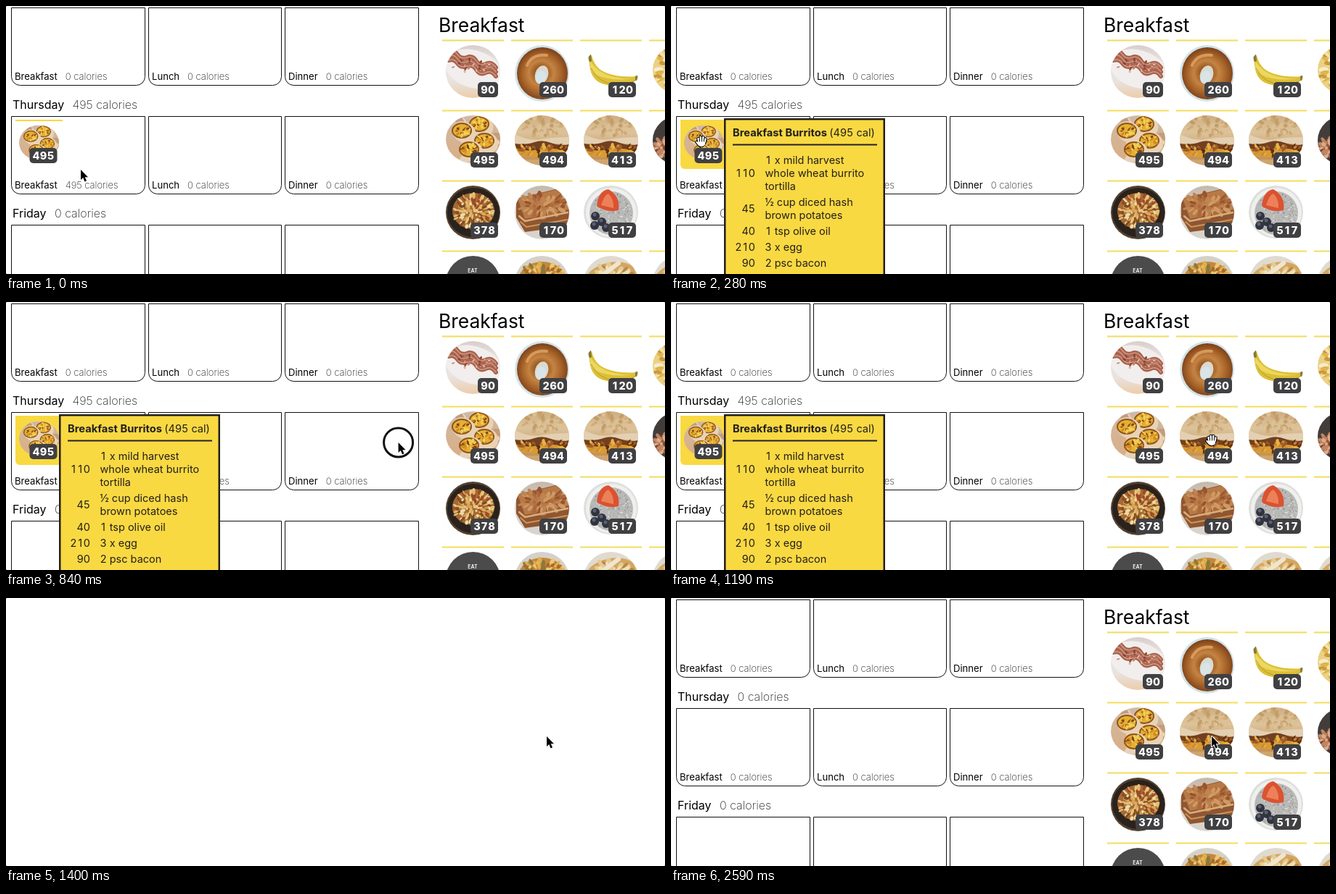
An HTML page with a canvas that plays this animation: 908 px wide and 370 px high, repeating every 2660 ms.

```html
<!DOCTYPE html>
<html lang="en">
<head>
<meta charset="utf-8">
<title>Meal planner</title>
<style>
  html, body { margin: 0; width: 100%; height: 100%; overflow: hidden; background: #999; }
  canvas { display: block; background: #fff; border-radius: 2px; }
</style>
</head>
<body>
<canvas id="stage" width="908" height="370"></canvas>
<script>
const ctx = document.getElementById('stage').getContext('2d');
const LOOP = 2660, STEP = 70;
const YELLOW = '#f9d941', INK = '#231f20';

let seed = 1;
const rand = () => (seed = seed * 16807 % 2147483647) / 2147483647;

function text(str, x, y, size, weight = 400, color = '#000', align = 'left') {
  ctx.font = `${weight} ${size}px Inter, sans-serif`;
  ctx.fillStyle = color;
  ctx.textAlign = align;
  ctx.fillText(str, x, y);
  return ctx.measureText(str).width;
}

// Text whose digits all take the same width
function tabular(str, x, y, size, weight, color, cell = size * 0.63) {
  for (const part of str.split(/(\d)/)) {
    if (/\d/.test(part)) {
      text(part, x + cell / 2, y, size, weight, color, 'center');
      x += cell;
    } else {
      x += text(part, x, y, size, weight, color);
    }
  }
}

function rect(color, x, y, w, h, radius = 0) {
  ctx.fillStyle = color;
  ctx.beginPath();
  ctx.roundRect(x, y, w, h, radius);
  ctx.fill();
}

function blob(color, x, y, rx, ry = rx, turn = 0) {
  ctx.fillStyle = color;
  ctx.beginPath();
  ctx.ellipse(x, y, rx, ry, turn, 0, 7);
  ctx.fill();
}

function stroke(color, width, path) {
  ctx.strokeStyle = color;
  ctx.lineWidth = width;
  ctx.lineCap = ctx.lineJoin = 'round';
  ctx.stroke(new Path2D(path));
}

function fill(color, path) {
  ctx.fillStyle = color;
  ctx.fill(new Path2D(path));
}

function specks(count, colors, x, y, rx, ry, size) {
  for (let i = 0; i < count; i++) {
    const a = rand() * 6.28, r = Math.sqrt(rand());
    blob(colors[i % colors.length], x + Math.cos(a) * r * rx, y + Math.sin(a) * r * ry,
      size * (0.5 + rand()), size * (0.3 + rand() * 0.5), a);
  }
}

function shade(y1, ...colors) {
  const g = ctx.createLinearGradient(0, 0, 0, y1);
  colors.forEach((c, i) => g.addColorStop(i / (colors.length - 1), c));
  return g;
}

// Each dish is drawn in a box 75 wide: [height, paint]
const dishes = {
  bacon: [73, () => {
    rect(shade(73, '#d8cfcb', '#e9e4e2', '#e9e3e1', '#eccdab'), 0, 0, 75, 73);
    blob('#f1eeed', 38, 33, 40, 26, 0.3);
    for (const dy of [0, 6, 12]) {
      const path = `M4 ${9 + dy}q7-3 12 4t13 4t13 5t13 4t14 5`;
      stroke('#a9624c', 6, path);
      stroke('#cf9a86', 1.5, path);
    }
    specks(34, ['#8c4534', '#c57f69', '#dfb5a5'], 36, 28, 29, 9, 2);
  }],
  bagel: [78, () => {
    rect('#d3e2e8', 0, 0, 75, 78);
    const g = ctx.createRadialGradient(36, 38, 8, 38, 40, 36);
    ['#9a5a22', '#c48443', '#a8642a', '#7d431a'].forEach((c, i) => g.addColorStop(i / 3, c));
    blob(g, 38, 39, 35, 36);
    stroke('#d79a5c', 4, 'M17 28Q24 12 44 14');
    blob('#dcd9d0', 37, 41, 9, 13, 0.3);
    blob('#d7e4e8', 36, 44, 7, 9, 0.3);
  }],
  banana: [75, () => {
    fill('#dcbf35', 'M7 15L11 14Q15 33 33 39T73 43L74 48Q56 58 33 55T8 27Z');
    fill('#ecd75f', 'M9 22Q19 38 38 43T71 45Q50 50 29 45T9 28Z');
    stroke('#b39a38', 1, 'M10 32Q22 54 44 54T72 48');
    stroke('#86793a', 4, 'M8 14L9 21M73 44v3');
  }],
  burritos: [66, () => {
    rect(shade(66, '#cdb9a6', '#d5b493', '#d9ad84'), 0, 0, 75, 66);
    specks(18, ['#e3d2bf', '#c39d7c'], 38, 33, 38, 33, 9);
    for (const [x, y] of [[46, 12], [22, 21], [53, 35], [32, 47]]) {
      blob('#e9d3b5', x + 3, y + 2, 17, 14, 0.5);
      blob('#8e541f', x, y, 14, 11);
      blob('#e5b032', x, y, 12, 9);
      specks(22, ['#f3cf55', '#7b3d15', '#cf8a24'], x, y, 11, 8, 2.5);
    }
  }],
  muffin: [69, () => {
    rect(shade(69, '#cfae80', '#dcc39c', '#cda26d', '#bb8950'), 0, 0, 75, 69);
    specks(50, ['#c39d69', '#dcc194', '#cfab79'], 38, 14, 34, 14, 3.5);
    fill('#e3d0b2', 'M0 26Q20 36 36 33T75 30V42Q50 35 38 43T0 38Z');
    fill('#71401f', 'M0 39Q16 41 27 37T50 38T75 40V50Q55 46 45 51T0 46Z');
    fill('#d99a31', 'M0 45Q18 51 31 47T75 49V57Q38 62 0 54Z');
    specks(50, ['#9f5a25', '#e8b444', '#5d2e13', '#c98a3c'], 38, 48, 36, 9, 3);
    rect('#cfa56f', 0, 61, 75, 8);
  }],
  bowl: [74, () => {
    rect('#51402f', 0, 0, 75, 74);
    blob('#2a221c', 38, 37, 36, 34);
    blob('#a56a34', 38, 35, 29, 25);
    specks(170, ['#e6c67e', '#d9a453', '#efdba6', '#9c4a28', '#e2b768', '#7d4a22'], 38, 35, 27, 23, 3);
  }],
  toast: [74, () => {
    rect(shade(74, '#c4b8aa', '#dcd4ca', '#d8d3cf'), 0, 0, 75, 74);
    fill('#8f5630', 'M2 18L60 4L75 34V56L14 64L2 44Z');
    fill('#b87948', 'M4 18L60 5L75 33L14 46Z');
    specks(80, ['#98552c', '#cf9a63', '#ac6a3b', '#bf8452'], 38, 27, 33, 17, 4);
    stroke('#d9ae7c', 2.5, 'M6 42L14 49L73 37');
    stroke('#c9965f', 2, 'M8 50L16 57L72 47');
  }],
  chia: [73, () => {
    rect('#dededc', 0, 0, 75, 73);
    blob('#efefee', 38, 37, 35, 34);
    blob('#b9b9b7', 38, 38, 30, 30);
    specks(200, ['#8d8c88', '#dededc', '#a5a4a0'], 38, 38, 28, 28, 1.2);
    for (const [x, y] of [[16, 42], [25, 50], [15, 55], [31, 58]]) {
      blob('#30333f', x, y, 6);
      blob('#596175', x - 1, y - 2, 2.5);
    }
    fill('#db5230', 'M18 28Q20 7 34 5Q51 15 48 34Q32 38 18 28Z');
    fill('#ec8159', 'M24 27Q28 13 34 11Q42 19 41 31Z');
  }],
  scramble: [68, () => {
    rect('#ecd184', 0, 0, 75, 68);
    specks(110, ['#f3e2a8', '#dfb44d', '#f5ecd0', '#c9993e'], 37, 34, 36, 33, 4.5);
  }],
  skillet: [69, () => {
    rect('#433d3a', 0, 0, 75, 69);
    fill('#a0583a', 'M0 40L30 24L75 22V58H0Z');
    specks(60, ['#c08563', '#76402c', '#d9ad8b'], 20, 44, 24, 12, 4);
  }],
  dark: [74, () => {
    rect('#4b4b4b', 0, 0, 75, 74);
    text('EAT', 37, 23, 7, 600, '#fff', 'center');
  }],
  omelette: [74, () => {
    rect('#d5d1c9', 0, 0, 75, 74);
    blob('#c4883a', 38, 34, 33, 26);
    specks(110, ['#e0ae4d', '#a8692b', '#ecc874', '#8a7a3c'], 38, 30, 31, 21, 3.5);
  }],
  flatbread: [74, () => {
    rect('#e0dacf', 0, 0, 75, 74);
    blob('#d3a660', 38, 30, 36, 21, -0.2);
    specks(60, ['#e5ca92', '#b98643', '#efe0b8'], 38, 28, 30, 16, 4.5);
    stroke('#f0e5cd', 6, 'M28 25L48 10');
  }],
};

function dish(name, x, y, scale = 1) {
  const [height, paint] = dishes[name];
  ctx.save();
  ctx.translate(x, y);
  ctx.scale(scale, scale);
  ctx.beginPath();
  ctx.ellipse(37.5, height / 2, 37.5, height / 2, 0, 0, 7);
  ctx.clip();
  seed = 77;
  paint();
  ctx.restore();
}

function badge(value, right, y) {
  const w = value.length * 10 + 8;
  rect('#404042', right - w, y, w, 21, 5);
  tabular(value, right - w + 4, y + 15.5, 14.4, 800, '#fff', 10);
}

const menu = [
  ['bacon 90', 'bagel 260', 'banana 120', 'scramble'],
  ['burritos 495', 'muffin 494', 'muffin 413', 'skillet'],
  ['bowl 378', 'toast 170', 'chia 517', ''],
  ['dark', 'omelette', 'flatbread', 'flatbread'],
];

function drawMenu() {
  text('Breakfast', 596, 36, 26.4);
  menu.forEach((row, r) => row.forEach((item, c) => {
    const x = 601 + c * 95, y = 47 + r * 97, [name, calories] = item.split(' ');
    rect('#f4dc5c', x, y - 0.5, 85, 2);
    if (name) dish(name, x + 5, y + 7);
    if (calories) badge(calories, x + 77, y + 58);
  }));
}

const columnX = i => Math.round(7.4 + 188.4 * i);

function drawPlan(filled) {
  [2, 152, 302].forEach((top, day) => {
    ['Breakfast', 'Lunch', 'Dinner'].forEach((meal, i) => {
      const x = columnX(i), total = filled && day === 1 && i === 0 ? 495 : 0;
      ctx.strokeStyle = '#111';
      ctx.lineWidth = 1;
      ctx.beginPath();
      ctx.roundRect(x + 0.5, top + 0.5, columnX(i + 1) - 5 - x, 107, [0, 0, 12, 12]);
      ctx.stroke();
      const width = text(meal, x + 5, top + 100, 13.1);
      text(total + ' calories', x + 16 + width, top + 100, 13, 200, '#222');
    });
  });
  text('Thursday', 9, 142, 16);
  text(`${filled ? 495 : 0} calories`, 91.5, 142, 16, 200, '#222');
  text('Friday', 9, 292, 16);
  text('0 calories', 67, 292, 16, 200, '#222');
}

function drawTile(active) {
  rect(YELLOW, 13, 157, 65, active ? 68 : 2, active ? [0, 0, 6, 6] : 0);
  dish('burritos', 18, 164.5, 55 / 75);
  badge('495', 70.5, 196);
}

const ingredients = [
  ['110', 236, '1 x mild harvest', 'whole wheat burrito', 'tortilla'],
  ['45', 285, '½ cup diced hash', 'brown potatoes'],
  ['40', 316, '1 tsp olive oil'],
  ['210', 338, '3 x egg'],
  ['90', 360, '2 psc bacon'],
];

function drawTooltip() {
  rect(INK, 73, 155, 222, 230);
  rect(YELLOW, 75.5, 157.5, 217, 230);
  const width = text('Breakfast Burritos ', 85, 180, 14.7, 700, INK);
  tabular('(495 cal)', 85 + width, 180, 14.6, 400, INK);
  rect(INK, 85, 190.5, 199, 2);
  for (const [calories, y, ...lines] of ingredients) {
    tabular(calories, 116 - calories.length * 9.2, y, 14.5, 400, INK, 9.2);
    lines.forEach((line, i) =>
      tabular(line, 129.5, y + (i - (lines.length - 1) / 2) * 18, 14.5, 400, INK));
  }
}

// Pointer stops: time, x, y
const stops = [[0, 103, 226], [210, 42, 187], [490, 42, 187], [630, 119, 200],
  [1120, 745, 191], [LOOP, 745, 191]];

function pointerAt(t) {
  const i = stops.findIndex(s => s[0] > t);
  const [t0, x0, y0] = stops[i - 1], [t1, x1, y1] = stops[i];
  const k = (t - t0) / (t1 - t0);
  const p = t0 === 490 ? k * k : 1 - (1 - k) ** 2;
  return [x0 + (x1 - x0) * p, y0 + (y1 - y0) * p];
}

function drawPointer(x, y, hand, pressed) {
  ctx.save();
  ctx.translate(x, y);
  if (pressed) stroke('#111', 3, 'M-20 0a20 20 0 1 0 40 0a20 20 0 1 0-40 0');
  if (hand) {
    const fingers = 'M-3.5 1L-4.5-4M-1 0L-1.3-6M2 0L2.3-6M4.5 1L5.5-3.5M-6.5 1L-3 5M-3 4Q0 8 3 4L4.5 1';
    stroke('#000', 4.6, fingers);
    stroke('#fff', 2.4, fingers);
    blob('#fff', 0.5, 3, 4.5, 3.5);
    stroke('#000', 0.9, 'M-2.7 0v-3M0.5 0v-4M3.4 0v-3');
  } else {
    const arrow = 'M0 0V14L3.2 11L5.5 16.4L8 15.3L5.7 10.2H10Z';
    stroke('#fff', 2, arrow);
    fill('#000', arrow);
  }
  ctx.restore();
}

function draw(t) {
  ctx.clearRect(0, 0, 908, 370);
  const filled = t < 1400, loading = t >= 1400 && t < 1890;
  const hovered = filled && t >= 140;
  if (!loading) {
    drawPlan(filled);
    drawMenu();
    if (filled) drawTile(hovered);
    if (hovered) drawTooltip();
  }
  const pressed = t >= 490 && t < 1190;
  drawPointer(...pointerAt(t), hovered && !pressed, pressed);
}

let shown = -1;
function tick() {
  const t = Math.floor(performance.now() % LOOP / STEP) * STEP;
  if (t !== shown) draw(shown = t);
  requestAnimationFrame(tick);
}
tick();
</script>
</body>
</html>
```
